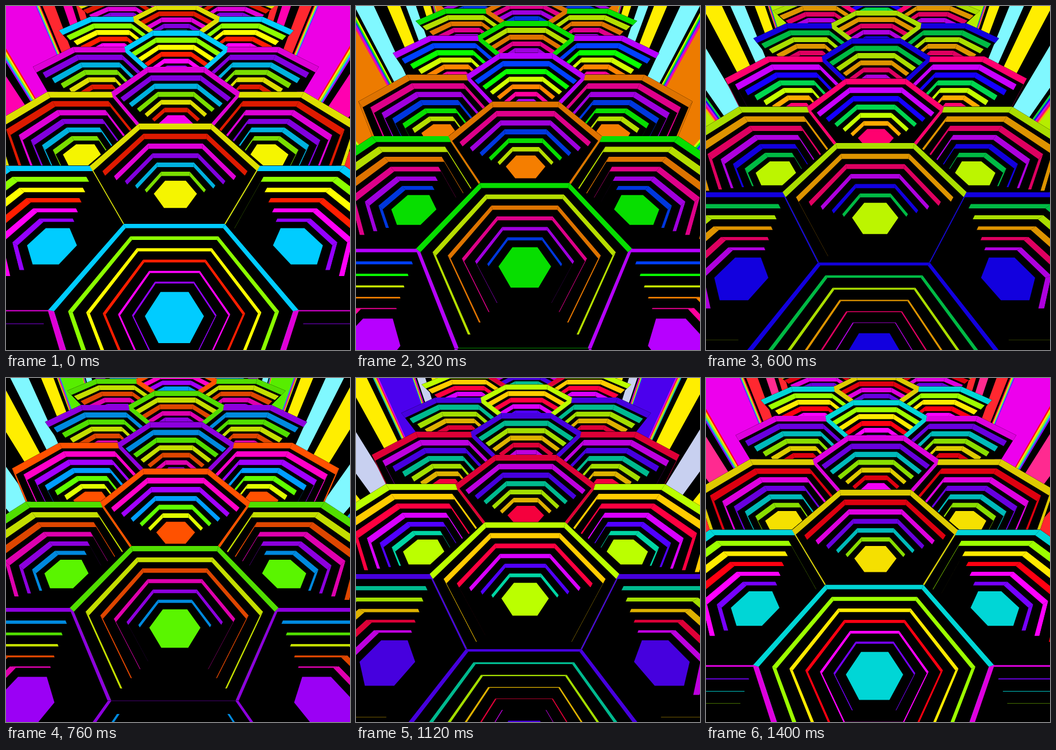
An HTML page with a canvas that plays this animation: 600x600 px, repeating every 1.44 s.

```html
<!DOCTYPE html>
<html>
<head>
<meta charset="utf-8">
<style>
html, body { margin: 0; width: 100%; height: 100%; overflow: hidden; background: #000; }
canvas { display: block; width: 600px; height: 600px; }
</style>
</head>
<body>
<canvas id="stage" width="600" height="600"></canvas>
<script>
const ctx = document.getElementById('stage').getContext('2d');
const STEP_MS = 40, STEPS = 36;

// Camera looking down on a plane of hexagons with side 1
const FOCAL = 391, PITCH = Math.atan(550 / FOCAL), HEIGHT = 2.069, SHIFT = -0.037;
const SIN = Math.sin(PITCH), COS = Math.cos(PITCH);
const HALF_ROW = 0.7358, START = 0.914;
const SQUASH = HALF_ROW / Math.sin(Math.PI / 3);

// Each pit is a staircase of six walls around a flat core
const WALL = 0.106, INSET = 0.116, RINGS = 6;

// Rainbow: six steps per colour, red to magenta
const HUES = [
  356, 7, 19, 31, 40, 48, 55, 60, 67, 71, 74, 76,
  83, 87, 98, 118, 142, 166, 180, 192, 203, 225, 245, 259,
  268, 275, 278, 283, 287, 291, 300, 302, 313, 323, 334, 345
];

const mod = (a, n) => ((a % n) + n) % n;

function tint(index, value) {
  const q = mod(index, STEPS);
  const v = q >= 16 && q <= 18 ? value * 0.84 : value;
  return `hsl(${HUES[q]}, 100%, ${50 * v}%)`;
}

function project(x, g, depth) {
  const down = HEIGHT + depth;
  const z = g * COS + down * SIN;
  return [
    300 + FOCAL * (x + SHIFT) / z,
    300 + FOCAL * (down * COS - g * SIN) / z
  ];
}

function hexagon(x, g, radius, depth) {
  return Array.from({ length: 6 }, (_, k) => {
    const a = k * Math.PI / 3;
    return project(x + radius * Math.cos(a), g + radius * SQUASH * Math.sin(a), depth);
  });
}

function fill(points, color) {
  ctx.beginPath();
  points.forEach(p => ctx.lineTo(p[0], p[1]));
  ctx.closePath();
  ctx.fillStyle = color;
  ctx.fill();
}

function facesCamera([a, b, c, d]) {
  return (c[0] - a[0]) * (d[1] - b[1]) - (c[1] - a[1]) * (d[0] - b[0]) < 0;
}

const ahead = (steps) => START + HALF_ROW * steps;
const farEdge = (column, row, n) => 2 * row + Math.abs(column) - n / 6;
const rowHue = (row, n) => 19 - 12 * row + n;
const rowValue = (row) => mod(row, 3) === 0 ? 1 : 0.87;

function wallFace(x, g, radius, depth, k) {
  const top = hexagon(x, g, radius, depth);
  const low = hexagon(x, g, radius, depth + WALL);
  const j = (k + 1) % 6;
  return [top[k], top[j], low[j], low[k]];
}

function drawCell(column, row, n) {
  const x = 1.5 * column;
  const g = ahead(farEdge(column, row, n) - 1);
  const hue = rowHue(row, n), value = rowValue(row);

  // Every opening hides what lies below its near lip
  ctx.save();
  for (let i = 0; i < RINGS; i++) {
    const radius = 1 - INSET * i, depth = WALL * i;
    fill(hexagon(x, g, radius, depth), '#000');
    ctx.clip();
    for (let k = 0; k < 6; k++) {
      const face = wallFace(x, g, radius, depth, k);
      if (facesCamera(face)) fill(face, tint(hue - 6 * i, value));
    }
  }
  const q = mod(hue, STEPS);
  const coreValue = q > 14 && q < 25 ? value : Math.max(value, 0.96);
  fill(hexagon(x, g, 1 - INSET * RINGS, WALL * RINGS), tint(hue, coreValue));
  ctx.restore();
}

// Shared wall of a side cell and the middle cell behind it;
// each side shows the colour of the other
function drawSeam(side, row, n) {
  const g = ahead(farEdge(side, row, n) - 1);
  const face = wallFace(1.5 * side, g, 1, 0, side < 0 ? 0 : 2);
  const owner = facesCamera(face) ? row + 1 : row;
  const color = tint(rowHue(owner, n), rowValue(owner));
  fill(face, color);
  ctx.beginPath();
  ctx.moveTo(...face[0]);
  ctx.lineTo(...face[1]);
  ctx.lineWidth = 1.5;
  ctx.strokeStyle = color;
  ctx.stroke();
}

// Upright band of the left wall between two distances
function wallBand(from, to, color) {
  const a = ahead(from), b = ahead(to);
  if (a < 0) return;
  const at = (g, depth) => project(-2.2, g, depth);
  fill([at(a, 0.4), at(a, -1.5), at(b, -1.5), at(b, 0.4)], color);
}

function drawWall(n) {
  const beat = n % 12;
  const pink = beat >= 9 || beat <= 2;
  const bands = pink
    ? ['#ff2830', beat < 3 ? '#ff00b0' : '#ff2a90']
    : [beat === 4 ? '#c8d0f0' : '#80f8ff', '#ffee00'];
  const first = Math.floor(n / 12) - 1;
  for (let row = first; row < first + 8; row++) {
    const s = 2 * row + 0.72 - n / 6;
    if (mod(row, 3) === 1) {
      wallBand(s, s + 2, tint(n - 5, 0.93));
      for (let i = 0; i < 5; i++) {
        const color = tint(n - 11 - 6 * i, 1);
        wallBand(s + i * 0.04, s + (i + 1) * 0.04, color);
        wallBand(s + 1.8 + i * 0.04, s + 1.84 + i * 0.04, color);
      }
    } else {
      wallBand(s + 0.1, s + 0.7, bands[0]);
      wallBand(s + 1.2, s + 1.8, bands[1]);
    }
  }
}

function draw(n) {
  ctx.fillStyle = '#000';
  ctx.fillRect(0, 0, 600, 600);

  drawWall(n);
  ctx.save();
  ctx.translate(597, 0);
  ctx.scale(-1, 1);
  drawWall(n);
  ctx.restore();

  const first = Math.floor(n / 12) - 1;
  const inView = (column, row) => farEdge(column, row, n) > -1.6;
  for (let row = first + 7; row >= first; row--) {
    for (const side of [-1, 1]) {
      if (!inView(side, row)) continue;
      drawCell(side, row, n);
      drawSeam(side, row, n);
    }
    if (inView(0, row)) drawCell(0, row, n);
  }
}

const begin = performance.now();
function tick() {
  const elapsed = performance.now() - begin;
  draw(Math.floor(elapsed / STEP_MS) % STEPS);
  requestAnimationFrame(tick);
}
tick();
</script>
</body>
</html>
```
